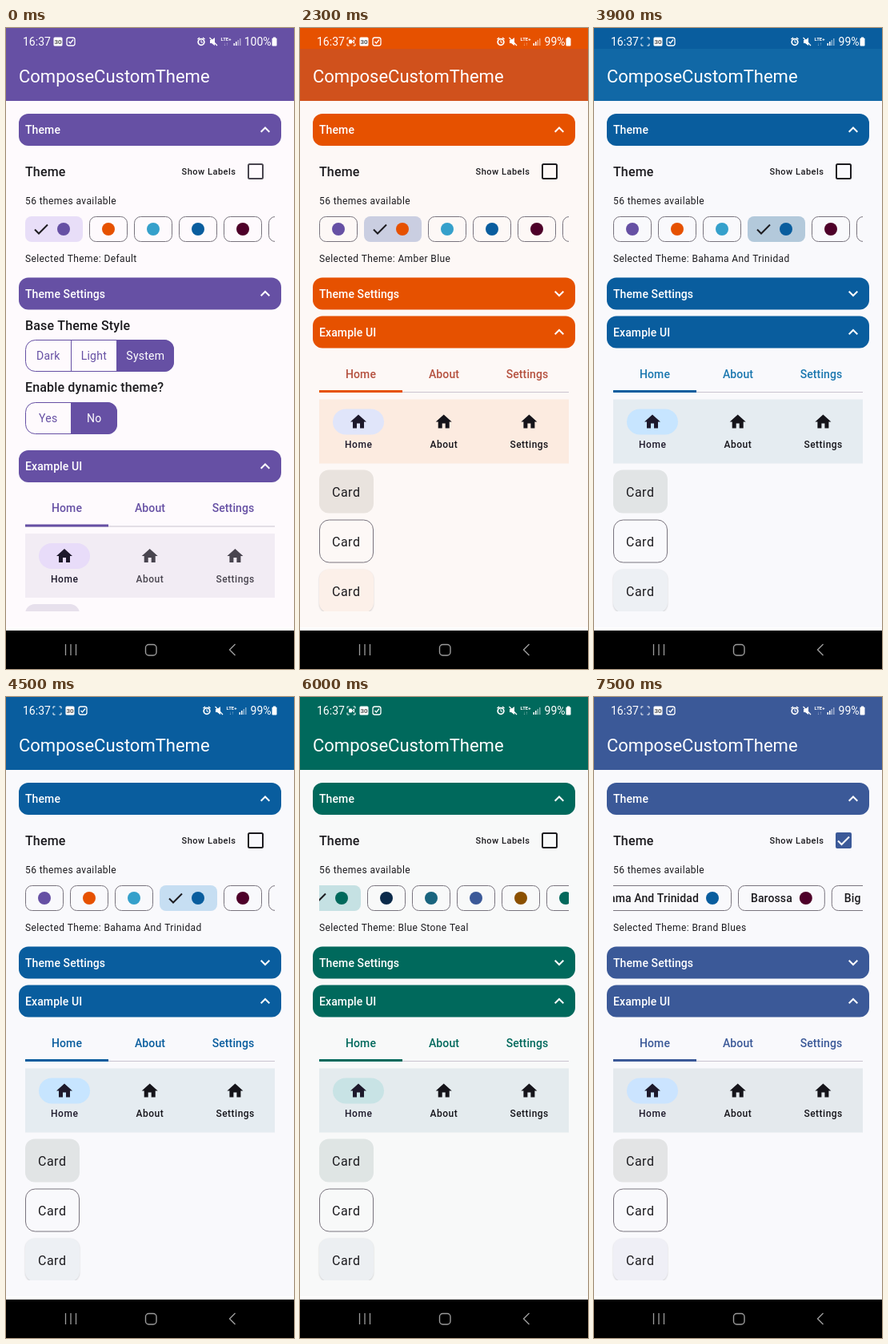
Animation of 360x800 px, one loop 8000 ms. Source, as an HTML page with a canvas:

```html
<!DOCTYPE html>
<html lang="en">
<head>
<meta charset="utf-8">
<title>Theme picker</title>
<style>
html, body { margin: 0; width: 100%; height: 100%; overflow: hidden; background: #000; }
canvas { display: block; width: 360px; height: 800px; }
</style>
</head>
<body>
<canvas id="stage"></canvas>
<script>
const canvas = document.getElementById('stage');
const ratio = window.devicePixelRatio || 1;
canvas.width = 360 * ratio;
canvas.height = 800 * ratio;
const c = canvas.getContext('2d');

const LOOP = 8000, STEP = 100, HOLD = 7500;
const INK = '#1c1b1f';

const chips = [
  ['Default', '#6650a4'], ['Amber Blue', '#e65100'], ['Aqua Blue', '#35a0cb'],
  ['Bahama And Trinidad', '#095d9e'], ['Barossa', '#4e0029'], ['Big Stone Tulip', '#1a2c42'],
  ['Blue Delight', '#1565c0'], ['Blue Stone Teal', '#00695c'], ['Blue Whale', '#0b2a4a'],
  ['Blumine Blue', '#19647e'], ['Brand Blues', '#3b5998'], ['Brown Orange', '#8b5000'],
  ['Camarone Green', '#04695c'], ['Dark Violet', '#4b2a7a']
];

function theme(at, chip, bg, sel, pill, nav, card, raised) {
  return { at, chip, bg, sel, pill, nav, card, raised, main: chips[chip][1] };
}
const themes = [
  theme(-9999, 0, '#fefafd', '#e8def8', '#e8dcf9', '#f2ecf4', '#e7e0ec', '#f5eff8'),
  theme(2140, 1, '#fdf8f6', '#dfe3f8', '#e0e5fa', '#fcebe0', '#e9e3de', '#fcf0e9'),
  theme(2950, 2, '#f8fafc', '#c9e6f3', '#c9e7f7', '#e4eef3', '#e0e6e8', '#ecf2f6'),
  theme(3740, 3, '#f9f9fc', '#c6def2', '#c7e5ff', '#e5ecf1', '#e1e4e5', '#edf0f4'),
  theme(5200, 7, '#f8f9f9', '#c5e1e3', '#c8e3e5', '#e4ebee', '#dfe5e4', '#eceff2'),
  theme(6300, 10, '#f9f9fc', '#cbe0f8', '#cbe4ff', '#e4e9ed', '#e3e4e5', '#efeff6')
];

const clamp = v => Math.max(0, Math.min(1, v));

// Critically damped spring from 0 to 1
function spring(ms, w) {
  if (ms <= 0) return 0;
  const x = w * ms / 1000;
  return 1 - (1 + x) * Math.exp(-x);
}

function mix(a, b, p) {
  const part = (h, i) => parseInt(h.slice(i, i + 2), 16);
  return 'rgb(' + [1, 3, 5].map(i => Math.round(part(a, i) + (part(b, i) - part(a, i)) * p)) + ')';
}

// Press shade that swells, then fades after the release
const press = (t, down, up) => 0.13 * clamp((t - down + 50) / 200) * clamp(1 - (t - up) / 400);

function rect(x, y, w, h, r, fill, line, width = 1) {
  c.beginPath();
  c.roundRect(x, y, w, h, r);
  if (fill) { c.fillStyle = fill; c.fill(); }
  if (line) { c.strokeStyle = line; c.lineWidth = width; c.stroke(); }
}

function path(points, color, width) {
  c.beginPath();
  for (let i = 0; i < points.length; i += 2) c.lineTo(points[i], points[i + 1]);
  c.strokeStyle = color;
  c.lineWidth = width;
  c.stroke();
}

function disc(x, y, r, color) {
  c.beginPath();
  c.arc(x, y, r, 0, 7);
  c.fillStyle = color;
  c.fill();
}

function font(size, weight, gap) {
  c.font = `${weight} ${size}px Roboto, sans-serif`;
  c.letterSpacing = gap + 'px';
}

function text(s, x, mid, size, color, weight = 400, gap = 0, align = 'left') {
  font(size, weight, gap);
  c.textAlign = align;
  c.fillStyle = color;
  c.fillText(s, x, mid + size * 0.356);
}

function clip(x, y, w, h, draw) {
  c.save();
  c.beginPath();
  c.rect(x, y, w, h);
  c.clip();
  draw();
  c.restore();
}

function header(label, y, color, turn = 0, shade = 0) {
  rect(16, y, 328, 40, 12, color);
  if (shade) rect(16, y, 328, 40, 12, `rgba(0,0,0,${shade})`);
  text(label, 24, y + 20.5, 14, '#fff', 500, 0.1);
  c.save();
  c.translate(324, y + 20);
  c.rotate(turn * Math.PI);
  path([-5.3, 2.8, 0, -2.5, 5.3, 2.8], '#fff', 2);
  c.restore();
}

function statusBar(t) {
  const w = '#fff', later = t >= 100;
  text('16:37', 21, 17, 14, w);
  if (later) {
    for (const sx of [-1, 1]) for (const sy of [-1, 1])
      path([64 + sx * 5, 17 + sy * 2.5, 64 + sx * 5, 17 + sy * 5, 64 + sx * 2.5, 17 + sy * 5], w, 1);
    if (t % 1000 < 400) {
      rect(61, 14.5, 4, 5, 1, w);
      path([65, 17, 67.5, 15, 67.5, 19, 65, 17], w, 1);
    }
  }
  const dx = later ? 15 : 0;
  rect(59.5 + dx, 11.5, 11, 11, 1.5, w);
  text('30', 65 + dx, 17.6, 8, '#555', 700, 0, 'center');
  rect(76 + dx, 12, 10, 10, 2.5, null, w, 1.3);
  path([78.5 + dx, 17, 80.5 + dx, 19, 84 + dx, 14.5], w, 1.3);

  const x = later ? 7 : 0;
  c.beginPath();
  c.arc(244 + x, 17.5, 3.8, 0, 7);
  c.strokeStyle = w;
  c.lineWidth = 1.8;
  c.stroke();
  path([244 + x, 15, 244 + x, 18, 246 + x, 18], w, 1);
  path([239.5 + x, 14, 242 + x, 12], w, 1.4);
  path([246 + x, 12, 248.5 + x, 14], w, 1.4);
  c.fillStyle = w;
  c.beginPath();
  for (const [px, py] of [[255, 15], [257, 15], [261, 12], [261, 22], [257, 19], [255, 19]]) c.lineTo(px + x, py);
  c.fill();
  path([254.5 + x, 12, 264 + x, 22], w, 1.2);
  text('LTE+', 275 + x, 13.5, 6, w, 700, 0, 'center');
  text('↓↑', 275 + x, 19.5, 6, 'rgba(255,255,255,.7)', 400, 0, 'center');
  for (let i = 0; i < 4; i++)
    rect(284.5 + x + i * 2.5, 19 - i * 2, 1.5, 3 + i * 2, 0, i < 2 ? w : 'rgba(255,255,255,.5)');
  text(later ? '99%' : '100%', 331.5, 17, 14, w, 400, 0, 'right');
  rect(332.5, 12.5, 6, 10, 1, w);
  rect(334, 11.5, 3, 2, 0, w);
}

function scrollAt(t) {
  if (t < 4600) return 0;
  if (t < 5900) return 229 * (1 - (1 - clamp((t - 4500) / 300)) ** 2);
  if (t < 6000) return 345;
  return t < 6100 ? 412 : 418;
}

function chipRow(t, cur) {
  const labels = t >= 7000;
  font(14, 500, 0.1);
  const widths = chips.map(([name], i) =>
    48 + (labels ? c.measureText(name).width + 9 : 0) + (i === cur.chip ? 24 : 0));
  let x = 24 - scrollAt(t);
  if (labels) x = 172 - 24 - widths.slice(0, 4).reduce((a, b) => a + b);
  const next = themes.find(th => th.at > t);
  clip(24, 230, 312, 42, () => {
    chips.forEach(([name, color], i) => {
      const w = widths[i], on = i === cur.chip;
      if (x < 340 && x + w > 20) {
        if (on) rect(x, 235, w, 32, 8, cur.sel);
        else rect(x + 0.5, 235.5, w - 1, 31, 8, null, '#79747e');
        let shade = 0;
        if (on && cur.at > 0) shade = press(t, cur.at - 200, cur.at + 50);
        else if (next && next.chip === i) shade = press(t, next.at - 150, next.at);
        if (shade > 0) rect(x, 235, w, 32, 8, `rgba(0,0,0,${shade})`);
        if (on) path([x + 12, 251.5, x + 17, 256.5, x + 28, 245.5], INK, 2);
        if (labels) text(name, x + 16 + (on ? 24 : 0), 251.5, 14, INK, 500, 0.1);
        disc(x + w - 24, 251, 8, color);
      }
      x += w + 8;
    });
  });
}

function segments(y, names, edges, active, color) {
  const left = edges[0], right = edges[edges.length - 1], last = names.length - 1;
  const r = 12;
  rect(edges[active], y, edges[active + 1] - edges[active], 40, active === last ? [0, r, r, 0] : 0, color);
  rect(left + 0.5, y + 0.5, right - left - 1, 39, r, null, color);
  edges.slice(1, -1).forEach(x => path([x + 0.5, y, x + 0.5, y + 40], color, 1));
  names.forEach((name, i) =>
    text(name, (edges[i] + edges[i + 1]) / 2 + 0.3, y + 20.5, 14, i === active ? '#fff' : color, 400, 0.25, 'center'));
}

const house = new Path2D('M10 20v-6h4v6h5v-8h3L12 3 2 12h3v8z');

function example(y, cur, tabColor) {
  header('Example UI', y, cur.main);
  ['Home', 'About', 'Settings'].forEach((s, i) =>
    text(s, 76 + i * 104, y + 72.5, 14, tabColor, 500, 0.1, 'center'));
  rect(24, y + 94.5, 312, 1, 0, '#cac4d0');
  rect(24, y + 92.5, 104, 3, 0, cur.main);

  rect(24, y + 104, 312, 80, 0, cur.nav);
  rect(41, y + 116, 64, 32, 16, cur.pill);
  const dim = cur.chip === 0 ? '#49454f' : '#15141a';
  ['Home', 'About', 'Settings'].forEach((s, i) => {
    const x = 73 + i * 106.7, color = i ? dim : '#1d192b';
    c.save();
    c.translate(x - 12, y + 120);
    c.fillStyle = color;
    c.fill(house);
    c.restore();
    text(s, x + 0.2, y + 160.5, 12, color, 500, 0.5, 'center');
  });

  for (let i = 0; i < 3; i++) {
    const top = y + 192 + i * 62;
    if (i === 1) {
      rect(24.5, top + 0.5, 67, 53, 12, null, '#79747e');
    } else {
      c.save();
      if (i === 2) {
        c.shadowColor = 'rgba(0,0,0,.18)';
        c.shadowBlur = 2 * ratio;
        c.shadowOffsetY = ratio;
      }
      rect(24, top, 68, 54, 12, i ? cur.raised : cur.card);
      c.restore();
    }
    text('Card', 40, top + 27.5, 16, INK, 400, 0.5);
  }
}

function checkbox(t, main) {
  const shade = t >= 6800 ? press(t, 6800, 7000) : 0;
  if (shade > 0) disc(312, 179, 20, `rgba(0,0,0,${shade})`);
  if (t >= 7000) {
    rect(302, 169, 20, 20, 2, main);
    path([305, 179.5, 309.5, 184, 319, 174.5], '#fff', 2);
  } else {
    rect(303, 170, 18, 18, 1.5, null, t < 2140 ? '#49454f' : INK, 2);
  }
}

function systemBar() {
  rect(0, 752, 360, 48, 0, '#000');
  const gray = '#9c9c9c';
  for (const x of [74.5, 81, 87.5]) path([x, 769, x, 783], gray, 1.3);
  rect(174.5, 769.5, 13.5, 13.5, 4, null, gray, 1.4);
  path([286.5, 769, 279.5, 776, 286.5, 783], gray, 1.4);
}

function draw(t) {
  const index = themes.findLastIndex(th => th.at <= t);
  const cur = themes[index], prev = themes[Math.max(0, index - 1)];
  const since = t - cur.at;
  const fold = t >= 1700 ? 1 : spring(t - 1243, 20);
  const turn = t >= 1700 ? 1 : spring(t - 1246, 18);

  c.setTransform(ratio, 0, 0, ratio, 0, 0);
  rect(0, 0, 360, 800, 0, '#fff');
  rect(0, 91, 360, 657, 0, cur.bg);
  rect(0, 0, 360, 27, 0, cur.main);
  rect(0, 26, 360, 65, 0, mix(prev.main, cur.main, spring(since, 20)));
  statusBar(t);
  text('ComposeCustomTheme', 16, 60, 22, '#fff');

  header('Theme', 107, cur.main);
  text('Theme', 24, 179.5, 16, INK, 500, 0.15);
  text('Show Labels', 287.5, 179.5, 11, INK, 500, 0.5, 'right');
  checkbox(t, cur.main);
  text('56 themes available', 24, 216, 12, INK, 400, 0.4);
  chipRow(t, cur);
  text('Selected Theme: ' + chips[cur.chip][0], 24, 288, 12, INK, 400, 0.4);

  const y = 527 - 167.5 * fold;
  const shade = t >= 900 && t < 1700 ? press(t, 950, 1300) : 0;
  header('Theme Settings', 311.5, cur.main, turn, shade);
  if (fold < 1) {
    clip(0, 351, 360, y - 8 - 351, () => {
      c.globalAlpha = 1 - fold;
      text('Base Theme Style', 24, 371, 16, INK, 500, 0.15);
      segments(389, ['Dark', 'Light', 'System'], [24, 81, 138, 210], 2, cur.main);
      text('Enable dynamic theme?', 24, 448.5, 16, INK, 500, 0.15);
      segments(467, ['Yes', 'No'], [24, 81, 139], 1, cur.main);
    });
  }
  clip(0, 351, 360, 377, () => example(y, cur, mix(prev.main, cur.main, spring(since, 13))));
  systemBar();
}

const start = performance.now();
function tick() {
  const t = (performance.now() - start) % LOOP;
  draw(Math.min(HOLD, Math.floor(t / STEP) * STEP));
  requestAnimationFrame(tick);
}
tick();
</script>
</body>
</html>
```
